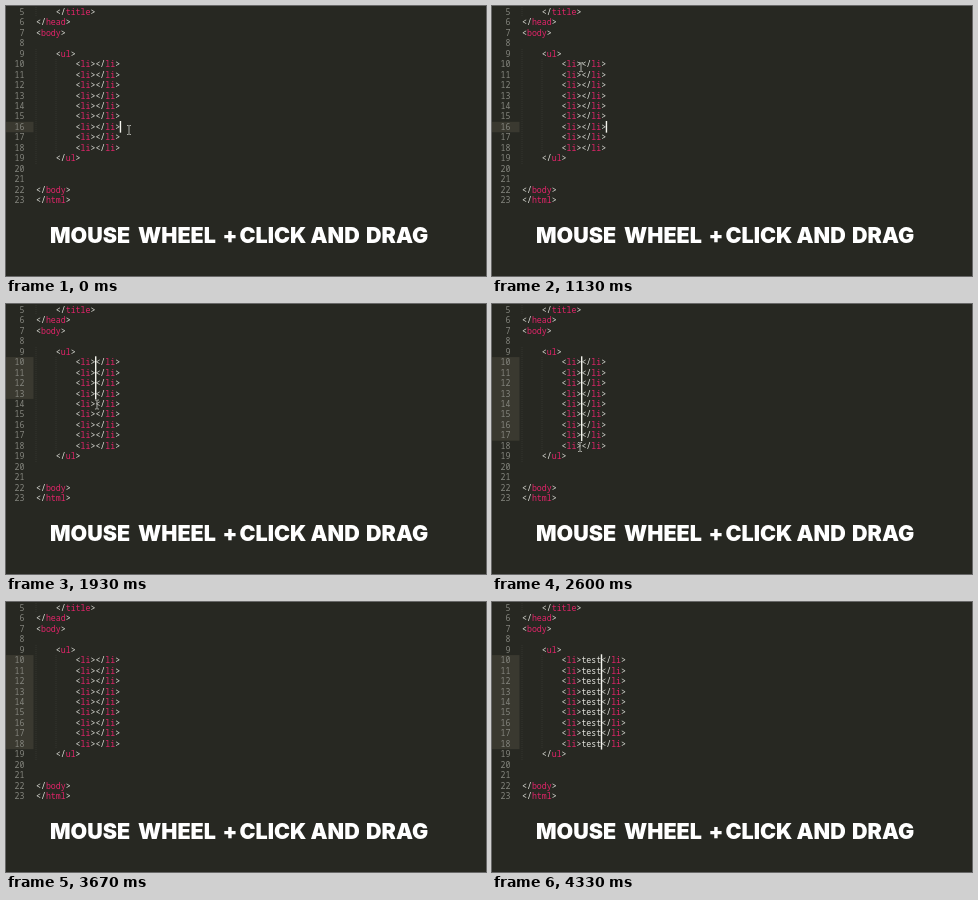
These frames come from a looping animation (480x270 px, 4670 ms). An HTML page:

```html
<!DOCTYPE html>
<html lang="en">
<head>
<meta charset="utf-8">
<title>Column selection</title>
<style>
  html, body { margin: 0; width: 100%; height: 100%; overflow: hidden; background: #272822; }
  svg { display: block; width: 100%; height: 100%; }
  .code text { font: 500 8.25px "Noto Sans Mono", monospace; fill: #e6e6e0; white-space: pre; }
  .code .number { fill: #85867f; font-weight: 400; text-anchor: end; }
  .code .tag { fill: #e3246a; }
  .guide { stroke: #3b3c35; stroke-width: .7; stroke-dasharray: 1 1; }
  .title text { font: 900 21.5px Inter, sans-serif; fill: #fff; }
  #gutter { fill: #3a3930; }
  #caret { fill: #f4f4ee; }
  #pointer { fill: none; stroke: #a9aaa4; stroke-width: 1; }
</style>
</head>
<body>
<svg viewBox="0 0 480 270">
  <rect width="480" height="270" fill="#272822"/>
  <rect id="gutter" width="27.5"/>
  <path class="guide" d="M30 1V11M30 43V158M50 53V147"/>
  <g id="code" class="code"></g>
  <rect id="caret" width="1.4"/>
  <path id="pointer" d="M-2-4.5H-.8L0-3.8L.8-4.5H2M0-3.8V3.8M-2 4.5H-.8L0 3.8L.8 4.5H2"/>
  <g class="title">
    <text x="44" y="237">MOUSE</text>
    <text x="132" y="237">WHEEL</text>
    <text x="216.500" y="237">+</text>
    <text x="233.500" y="237">CLICK</text>
    <text x="304.500" y="237">AND</text>
    <text x="360" y="237">DRAG</text>
  </g>
</svg>
<script>
const LOOP = 4670, STEP = 1000 / 15;
const ROW = 10.45, CHAR = 4.95, LEFT = 30;
const FIRST_ITEM = 10, LAST_ITEM = 18;

const $ = id => document.getElementById(id);
const rowTop = line => 53.1 + (line - 10) * ROW;
const column = n => LEFT + n * CHAR;

function add(parent, name, attrs, content = '') {
  const node = document.createElementNS('http://www.w3.org/2000/svg', name);
  for (const key in attrs) node.setAttribute(key, attrs[key]);
  node.textContent = content;
  return parent.appendChild(node);
}

function addTag(text, open, name) {
  add(text, 'tspan', {}, open);
  add(text, 'tspan', { class: 'tag' }, name);
  add(text, 'tspan', {}, '>');
}

// Line number: [indent, opening bracket, tag name]
const lines = {
  5: [4, '</', 'title'], 6: [0, '</', 'head'], 7: [0, '<', 'body'],
  9: [4, '<', 'ul'], 19: [4, '</', 'ul'],
  22: [0, '</', 'body'], 23: [0, '</', 'html']
};
const slots = [];

for (let line = 5; line <= 23; line++) {
  const y = rowTop(line) + 8.1;
  add($('code'), 'text', { class: 'number', x: 18.4, y }, line);
  const isItem = line >= FIRST_ITEM && line <= LAST_ITEM;
  const [indent, open, name] = isItem ? [8, '<', 'li'] : lines[line] || [];
  if (!name) continue;
  const text = add($('code'), 'text', { x: column(indent), y });
  addTag(text, open, name);
  if (isItem) {
    slots.push(add(text, 'tspan', {}));
    addTag(text, '</', 'li');
  }
}

// Tracks of [time, values...]
const pointerPath = [
  [0, 123, 124], [70, 122, 122], [300, 102, 84], [530, 90, 63], [1060, 89, 61],
  [1530, 89, 62], [1660, 90, 69], [1930, 91, 100], [2130, 90, 130],
  [2400, 89, 139], [2600, 88, 143], [2730, 88, 145.5], [2940, 88, 145.5], [3200, 152, 228]
];
const caretFade = [
  [0, 1], [260, 1], [460, 0], [790, 0], [1000, 1], [3340, 1], [3660, 0], [3930, 0], [4000, 1]
];
const lastLines = [
  [1390, 10], [1660, 11], [1790, 12], [1860, 13], [1990, 14],
  [2050, 16], [2120, 17], [2660, 18]
];
const keystrokes = [4060, 4125, 4260, 4325];

function sample(track, t) {
  const next = track.findIndex(key => key[0] > t);
  if (next < 0) return track[track.length - 1].slice(1);
  const [from, to] = [track[next - 1], track[next]];
  const k = (t - from[0]) / (to[0] - from[0]);
  return from.slice(1).map((v, i) => v + (to[i + 1] - v) * k);
}

function place(id, attrs) {
  for (const key in attrs) $(id).setAttribute(key, attrs[key]);
}

function draw(t) {
  const reached = lastLines.filter(key => key[0] <= t);
  const selecting = reached.length > 0;
  const first = selecting ? FIRST_ITEM : 16;
  const last = selecting ? reached[reached.length - 1][1] : 16;
  const typed = 'test'.slice(0, keystrokes.filter(time => time <= t).length);
  const y = rowTop(first), height = (last - first + 1) * ROW;

  slots.forEach(slot => { slot.textContent = typed; });
  place('gutter', { y, height });
  place('caret', {
    x: column(selecting ? 12 + typed.length : 17) - .4,
    y: y - .8, height: height + 1.2, opacity: sample(caretFade, t)[0]
  });
  place('pointer', {
    transform: `translate(${sample(pointerPath, t)})`,
    visibility: t < 3190 ? 'visible' : 'hidden'
  });
}

const start = performance.now();
function tick() {
  const t = (performance.now() - start) % LOOP;
  draw(Math.floor((t + 4) / STEP) * STEP);
  requestAnimationFrame(tick);
}
tick();
</script>
</body>
</html>
```
